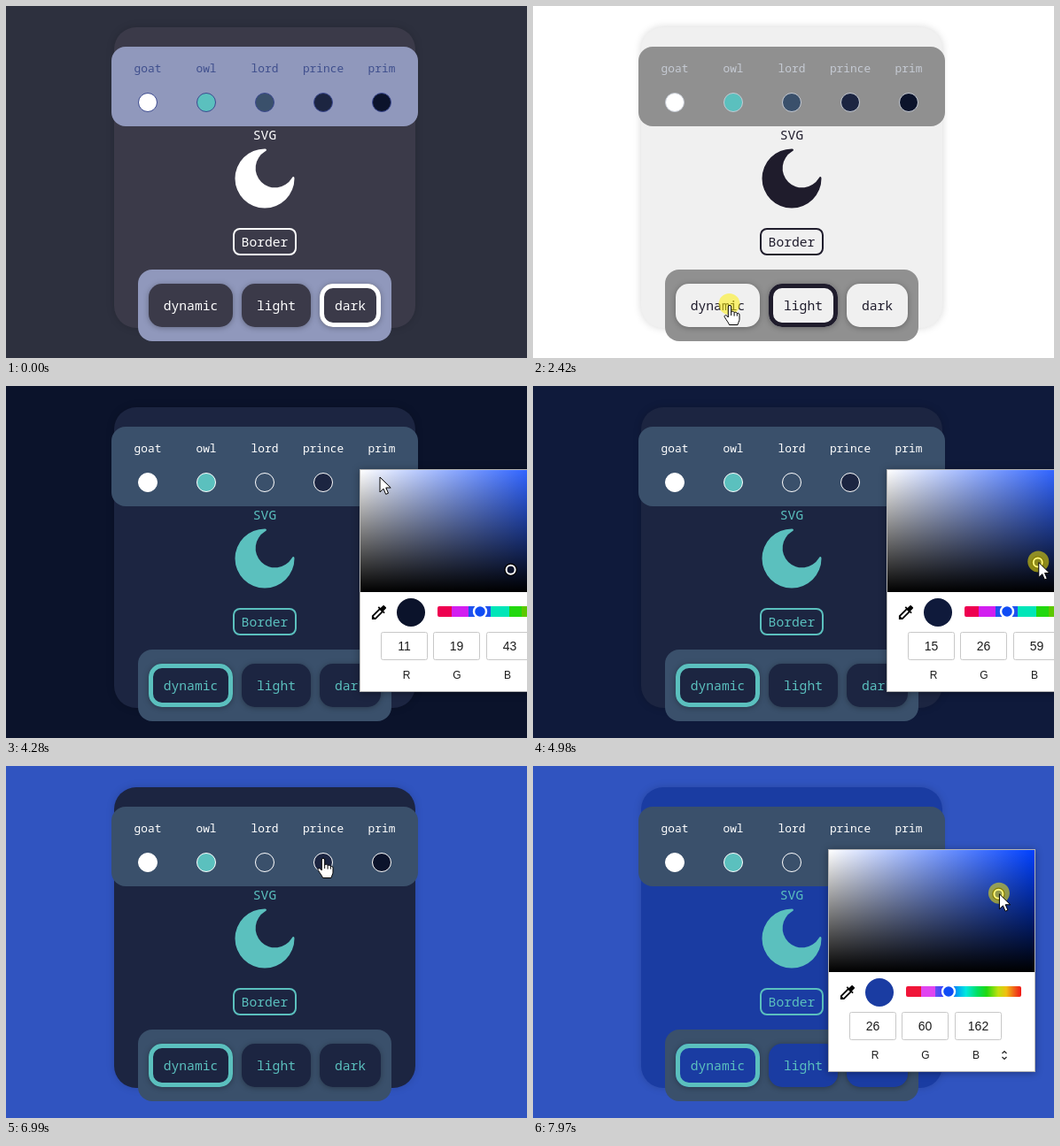
These frames come from a looping animation (588x398 px, 8 s). An HTML page:

```html
<!DOCTYPE html>
<html lang="en">
<head>
<meta charset="utf-8">
<title>Theme switcher</title>
<style>
html, body { margin: 0; width: 100%; height: 100%; overflow: hidden; }
svg { display: block; width: 588px; height: 398px; }
text { text-anchor: middle; white-space: pre; }
.mono { font: 14.667px "Noto Sans Mono", monospace; fill: var(--text); }
.label { font: 12.83px "Noto Sans Mono", monospace; fill: var(--label); }
.num { font: 14px "Liberation Sans", sans-serif; fill: #1c1c1c; }
.rgb { font: 12px "Liberation Sans", sans-serif; fill: #1c1c1c; }
.bg { fill: var(--bg); }
.card { fill: var(--card); }
.panel { fill: var(--panel); }
.ink { fill: var(--text); }
.edge { fill: none; stroke: var(--text); }
.dot { stroke: var(--ring); }
.soft { filter: drop-shadow(0 0 4px rgba(0,0,0,.16)); }
.lift { filter: drop-shadow(0 1px 3px rgba(0,0,0,.3)); }
.pop { filter: drop-shadow(0 1px 4px rgba(0,0,0,.35)); }
</style>
</head>
<body>
<svg id="stage" viewBox="0 0 588 398" xmlns="http://www.w3.org/2000/svg"></svg>
<script>
const LOOP = 8000, STEP = 70;
const stage = document.getElementById('stage');
const $ = id => document.getElementById(id);

const themes = {
  dark: { bg: '#2d303e', card: '#3b3a49', panel: '#9098bc', text: '#ffffff', label: '#3f4f8d', ring: '#3c4a90' },
  light: { bg: '#ffffff', card: '#f0f0f0', panel: '#909090', text: '#1f1c2c', label: '#c5cad3', ring: '#c5cad3' },
  dynamic: { bg: '#0b132b', card: '#1c2541', panel: '#3a506b', text: '#5bc0be', label: '#ffffff', ring: '#ffffff' }
};
const swatches = [
  ['goat', '#ffffff'], ['owl', '#5bc0be'], ['lord', '#3a506b'], ['prince', '#1c2541'], ['prim', '#0b132b']
].map(([name, color], i) => ({ name, color, x: 160 + 66 * i, y: 109 }));
const buttons = [
  { name: 'dynamic', x: 161, w: 95 }, { name: 'light', x: 266, w: 78 }, { name: 'dark', x: 354, w: 69 }
];

const rect = (x, y, w, h, r, attrs) =>
  `<rect x="${x}" y="${y}" width="${w}" height="${h}" rx="${r}" ${attrs}/>`;
const text = (x, y, cls, str, id = '') => `<text x="${x}" y="${y}" class="${cls}" id="${id}">${str}</text>`;
const gradient = (id, dir, stops) => `<linearGradient id="${id}" ${dir}>` +
  stops.map(([at, color, alpha = 1]) => `<stop offset="${at}" stop-color="${color}" stop-opacity="${alpha}"/>`).join('') +
  '</linearGradient>';
// Hard colour bands: each entry is [end, colour]
const bands = list => list.flatMap(([end, color], i) => [[i ? list[i - 1][0] : 0, color], [end, color]]);

const RIGHT = 'x1="0" x2="1" y1="0" y2="0"', DOWN = 'x1="0" x2="0" y1="0" y2="1"';
const defs = '<defs>' +
  gradient('sat', RIGHT, [[0, '#fff'], [1, '#0040ff']]) +
  gradient('val', DOWN, [[0, '#000', 0], [1, '#000']]) +
  gradient('hueA', RIGHT, bands([[.12, '#ee0050'], [.27, '#d21ff0'], [.46, '#1f52ee'], [.62, '#00e6b8'],
    [.73, '#22d80f'], [.85, '#5cc800'], [1, '#f06010']])) +
  gradient('hueB', RIGHT, bands([[.13, '#f01538'], [.25, '#e045f0']]).concat([[.25, '#6a50f0'], [.37, '#1040ff'],
    [.45, '#00a8f0'], [.52, '#00e8e0'], [.62, '#00e060'], [.7, '#20d810'], [.8, '#c0e010'], [.87, '#f0c010'],
    [.94, '#f06018'], [1, '#f01818']])) + '</defs>';

const moon = '<path class="ink" d="M292 161.5A33.5 33.5 0 1 0 325.5 195C325.5 193 324 192 322.5 194.7' +
  'A22 22 0 1 1 292.3 164.5C295 163 294 161.5 292 161.5z"/>';

const page = rect(0, 0, 588, 398, 0, 'class="bg"') +
  rect(122, 24, 340, 340, 25, 'class="card soft"') +
  rect(119, 46, 346, 90, 16, 'class="panel"') +
  swatches.map(s => text(s.x, 75, 'label', s.name) +
    `<circle class="dot" cx="${s.x}" cy="${s.y}" r="10.5" fill="${s.color}"/>`).join('') +
  text(292, 151, 'mono', 'SVG') + moon +
  rect(257, 252, 70, 29, 7, 'class="edge" stroke-width="2"') +
  text(292, 272, 'mono', 'Border') +
  rect(149, 298, 286, 81, 16, 'class="panel"') +
  buttons.map(b => rect(b.x, 314, b.w, 49, 15, 'class="card lift"') +
    rect(b.x + 2.5, 316.5, b.w - 5, 44, 12.5, `class="edge" stroke-width="5" id="sel-${b.name}"`) +
    text(b.x + b.w / 2, 344, 'mono', b.name)).join('');

const dropper = 'M20.7 5.6l-2.3-2.3c-.4-.4-1-.4-1.4 0l-3.2 3.1-1.9-1.9-1.4 1.4 1.4 1.4L3 16.2V21h4.8l8.9-8.9 ' +
  '1.4 1.4 1.4-1.4-1.9-1.9 3.1-3.1c.4-.4.4-1 0-1.5zM6.9 19L5 17.1 13.1 9 15 10.9z';

const picker = '<g id="picker">' +
  rect(-.5, 94.5, 233, 251, 0, 'class="pop" fill="#fff" stroke="#b4b4b4"') +
  rect(0, 95, 232, 138, 0, 'fill="url(#sat)"') + rect(0, 95, 232, 138, 0, 'fill="url(#val)"') +
  '<g id="marker"><circle r="5.2" fill="none" stroke="#000" stroke-width="4"/>' +
  '<circle r="5" id="core" stroke="#fff" stroke-width="2"/></g>' +
  `<path transform="translate(10.2 245.2) scale(.9)" d="${dropper}"/>` +
  '<circle id="chip" cx="57" cy="256" r="16"/>' +
  rect(87, 249, 130, 12, 2, 'id="hue"') +
  '<circle cx="135" cy="255" r="7" fill="#0f4cf5" stroke="#fff" stroke-width="2.4"/>' +
  [23, 82, 142].map((x, i) => rect(x + .5, 278.5, 52, 31, 2, 'fill="#fff" stroke="#c8c8c8"') +
    text(x + 26.5, 299, 'num', '', 'num' + i) + text(52 + 57 * i, 331, 'rgb', 'RGB'[i])).join('') +
  '<path d="M195.5 325l2.5-2.5 2.5 2.5M195.5 329l2.5 2.5 2.5-2.5" fill="none" stroke="#222" stroke-width="1.2"/></g>';

const pointer = '<circle id="glow" r="12" fill="#fff000" fill-opacity=".52"/>' +
  '<g id="cursor" fill="#fff" stroke="#000" stroke-linejoin="round">' +
  '<path id="arrow" d="M0 0V17l4-3.8 2.7 6.2 2.8-1.2L6.8 12H12.2z"/>' +
  '<path id="hand" d="M-1.7 14V2a1.7 1.7 0 0 1 3.4 0V8c.5-1 3-1 3.4.6c.6-.8 2.8-.6 3.2 1c.6-.6 2.7-.4 2.7 1.6v5' +
  'c0 2-1.6 4-2 6.3H-.5c-.5-2-3-5-5-8.3c-1.3-2 .8-3.4 2.3-2zM1.7 8v4M5.1 8.6v4M8.3 9.6v3"/></g>';

stage.innerHTML = defs + page + picker + pointer;

const ease = {
  both: p => p * p * (3 - 2 * p),
  in: p => p * p,
  out: p => p * (2 - p)
};
const ticks = (t, start, n) => t < start ? 0 : Math.min(1, (Math.floor((t - start) / STEP) + 1) / n);

const spot = (s, v) => [s * 228, 95.5 + (1 - v) * 135];
const mix = (a, b, p) => a.map((n, i) => n + (b[i] - n) * p);
const pickers = [
  { left: 400, from: 4210, to: 6640, drag: 4910, n: 10, a: [.744, .169], b: [.75, .753], key: 'bg', hue: 'hueA' },
  { left: 334, from: 7130, to: LOOP, drag: 7550, n: 7, a: [.569, .255], b: [.8395, .635], key: 'card', hue: 'hueB' }
];
const tip = (k, sv) => {
  const [x, y] = spot(...sv);
  return [pickers[k].left + x + 1, y];
};
const level = (k, t) => {
  const { a, b, drag, n } = pickers[k];
  return mix(a, b, ease.both(ticks(t, drag, n)));
};
const toRgb = ([s, v]) => [1, .75, 0].map(k => Math.round(255 * v * (1 - k * s)));

// start, ticks, target, easing
const moves = [
  [460, 8, [313, 341], 'out'],
  [1870, 6, [222, 338], 'both'],
  [2620, 9, [310, 258], 'in'],
  [3250, 10, [422, 103], 'out'],
  [4350, 8, tip(0, pickers[0].a), 'both'],
  [5940, 8, [351, 97], 'both'],
  [6710, 4, [358, 104], 'both'],
  [7200, 5, tip(1, pickers[1].a), 'both']
];
const presses = [[1280, 1410], [2420, 2550], [4080, 4210], [4910, 5870], [6500, 6640], [7060, 7130], [7550, LOOP]];

function cursorAt(t) {
  let pos = [501, 392];
  for (const [start, n, to, kind] of moves) {
    if (t < start) break;
    if (start === 5940) pos = tip(0, pickers[0].b);
    pos = mix(pos, to, ease[kind](ticks(t, start, n)));
  }
  pickers.forEach((p, k) => {
    if (t >= p.drag && t < (k ? LOOP : 5940)) pos = tip(k, level(k, t));
  });
  return pos;
}

function overControl(x, y) {
  return buttons.some(b => x >= b.x && x < b.x + b.w && y >= 314 && y < 363) ||
    swatches.some(s => Math.hypot(x - s.x, y - s.y) < 11);
}

const show = (id, on) => $(id).setAttribute('visibility', on ? 'visible' : 'hidden');
const place = (id, x, y) => $(id).setAttribute('transform', `translate(${x.toFixed(2)} ${y.toFixed(2)})`);

function draw(t) {
  const name = t < 1410 ? 'dark' : t < 2550 ? 'light' : 'dynamic';
  const colors = { ...themes[name] };
  pickers.forEach((p, k) => {
    if (t >= p.drag) colors[p.key] = `rgb(${toRgb(level(k, t))})`;
  });
  for (const key in colors) stage.style.setProperty('--' + key, colors[key]);
  buttons.forEach(b => show('sel-' + b.name, b.name === name));

  const k = pickers.findIndex(p => t >= p.from && t < p.to), open = k >= 0;
  $('picker').style.display = open ? '' : 'none';
  if (open) {
    const sv = level(k, t), rgb = toRgb(sv), fill = `rgb(${rgb})`;
    place('picker', pickers[k].left, 0);
    place('marker', ...spot(...sv));
    $('core').setAttribute('fill', fill);
    $('chip').setAttribute('fill', fill);
    $('hue').setAttribute('fill', `url(#${pickers[k].hue})`);
    rgb.forEach((n, i) => { $('num' + i).textContent = n; });
  }

  const [x, y] = cursorAt(t), seen = t >= 460;
  const inside = open && x >= pickers[k].left && y >= 95;
  const hand = overControl(x, y) && !inside;
  place('cursor', x, y);
  place('glow', x - .5, y - 1);
  show('arrow', seen && !hand);
  show('hand', seen && hand);
  show('glow', presses.some(([a, b]) => t >= a && t < b));
}

let origin;
function frame(now) {
  origin ??= now;
  draw((now - origin) % LOOP);
  requestAnimationFrame(frame);
}
draw(0);
requestAnimationFrame(frame);
</script>
</body>
</html>
```
